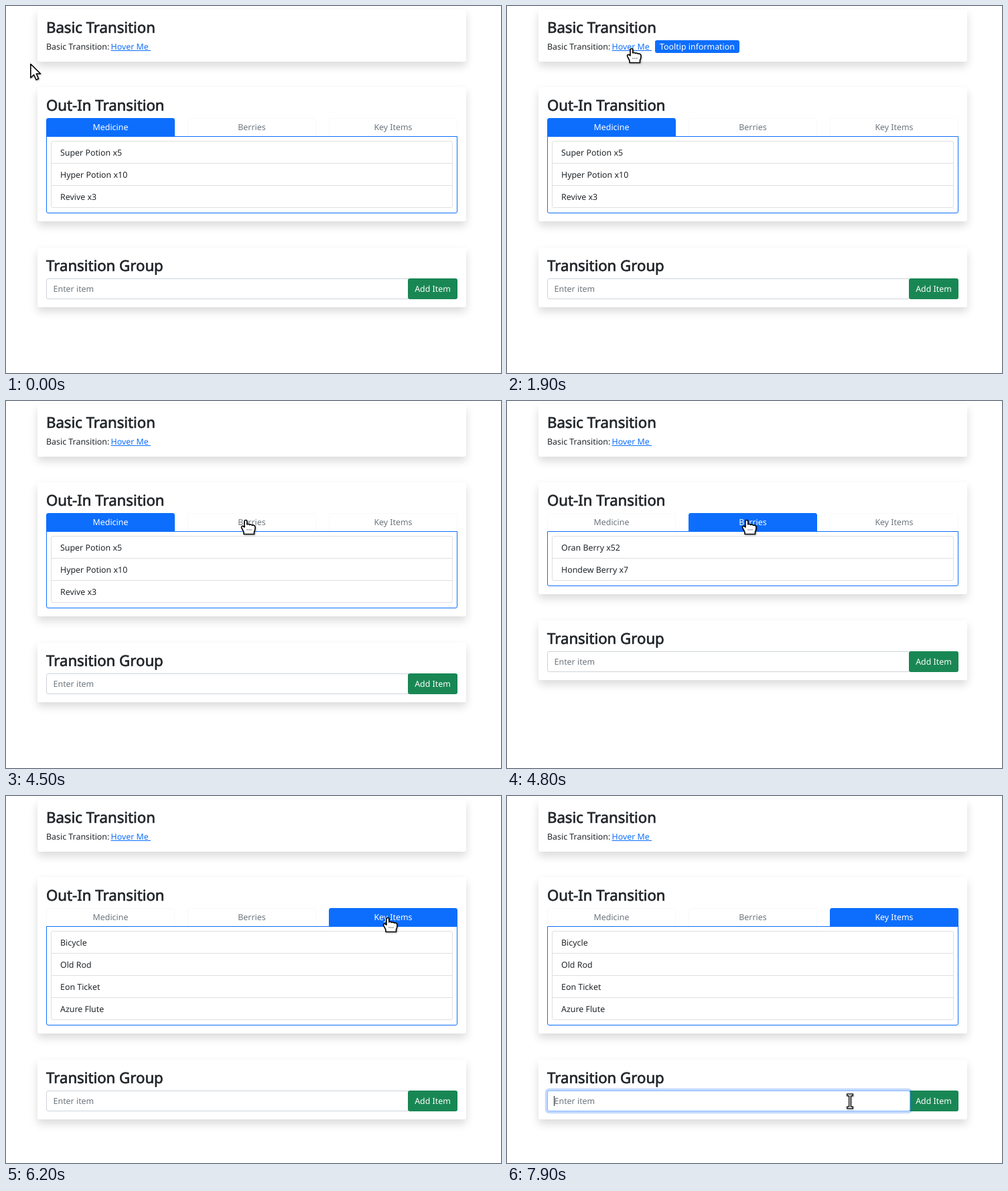
Write an HTML page that moves like this. It is 739 px wide and 547 px high and loops after 8000 ms.

```html
<!DOCTYPE html>
<html lang="en">
<head>
<meta charset="utf-8">
<title>Transitions</title>
<style>
  * { box-sizing: border-box; }
  html, body { margin: 0; width: 100%; height: 100%; overflow: hidden; background: #fff; }
  body {
    position: relative; color: #212529;
    font: 12.4px/19px "Noto Sans", "Open Sans", sans-serif;
    text-rendering: geometricPrecision; white-space: pre; cursor: default;
  }
  .card {
    position: absolute; left: 47px; width: 640px; border-radius: 3px; background: #fff;
    box-shadow: 0 6.4px 12.8px rgba(0, 0, 0, .15);
  }
  .card > * { position: absolute; }
  h3 {
    left: 13px; top: 13px; margin: 0;
    font-size: 22.2px; font-weight: 400; line-height: 27px; -webkit-text-stroke: .7px;
  }
  #basic { top: 5px; height: 78px; }
  #outin { top: 121px; height: calc(101px + 33px * var(--rows)); }
  #group { top: calc(261px + 33px * var(--rows)); height: 89px; }
  .label { left: 13px; top: 46px; }
  .link { left: 109.5px; top: 46px; color: #0d6efd; text-decoration: underline; }
  #tip {
    left: 174px; top: 46px; width: 126px; height: 19px; border-radius: 3px;
    background: #0d6efd; color: #fff; text-align: center;
  }
  .tab {
    left: calc(13px + 211px * var(--i)); top: 46px; width: 192px; height: 28px;
    border: 1px solid #f8f9fa; border-radius: 3px 3px 0 0;
    color: #6c757d; line-height: 26px; text-align: center;
  }
  .tab.on { background: #0d6efd; border-color: #0d6efd; color: #fff; }
  #box {
    left: 13px; top: 73px; width: 614px; height: calc(16px + 33px * var(--rows));
    border: 1px solid #0d6efd; border-radius: 0 0 3px 3px; padding: 6px;
  }
  #list { border: 1px solid #dfdfdf; border-radius: 3px; }
  .row { height: 33px; padding-left: 13px; line-height: 33px; border-bottom: 1px solid #dfdfdf; }
  .row:last-child { height: 32px; border: 0; }
  #field {
    left: 13px; top: 46px; width: 542px; height: 31px; padding-left: 9.6px;
    border: 1px solid #ced4da; border-radius: 3px; background: #fff; color: #6c757d; line-height: 29px;
  }
  #caret { position: absolute; left: 9px; top: 7px; width: 1px; height: 15px; background: #212529; }
  .add {
    left: 553px; top: 46px; width: 74px; height: 31px; border-radius: 3px;
    background: #198754; color: #fff; line-height: 31px; text-align: center;
  }
  #pointer {
    position: absolute; left: 0; top: 0; width: 1px; height: 1px; overflow: visible; z-index: 9;
    filter: drop-shadow(1px 1px 1px rgba(0, 0, 0, .3));
  }
  #pointer path { fill: #fff; stroke: #000; stroke-width: 1.6; stroke-linejoin: round; }
  #pointer .dots { fill: none; stroke-width: 1.2; stroke-dasharray: 1.2 1.6; }
  #pointer .beam { fill: none; stroke-width: 4; }
  #pointer .core { fill: none; stroke: #fff; stroke-width: 1.4; }
</style>
</head>
<body>
<div class="card" id="basic">
  <h3>Basic Transition</h3>
  <span class="label">Basic Transition:</span>
  <span class="link">Hover Me </span>
  <span id="tip">Tooltip information</span>
</div>
<div class="card" id="outin">
  <h3>Out-In Transition</h3>
  <div class="tab" style="--i:0">Medicine</div>
  <div class="tab" style="--i:1">Berries</div>
  <div class="tab" style="--i:2">Key Items</div>
  <div id="box"><div id="list"></div></div>
</div>
<div class="card" id="group">
  <h3>Transition Group</h3>
  <div id="field">Enter item<i id="caret"></i></div>
  <div class="add">Add Item</div>
</div>
<svg id="pointer">
  <g id="arrow"><path d="M.8 1.5V22L5.6 17.5 9 25l3.6-1.6L9.3 16H15.5Z"/></g>
  <g id="hand">
    <path d="M-2 10V1.4a1.9 1.9 0 0 1 3.8 0V6c1-.8 3.2-.6 3.9.6 1-.8 3.1-.5 3.9.8 1.3-.7 3.8-.2 4.2 1.6.6 3 .1 5.5-1.3 8V20.5H-3V17.5C-4 15-5.3 13-6.3 11c-.8-2 1.6-3.4 3-2z"/>
    <path class="dots" d="M1.5 14H10"/>
  </g>
  <g id="ibeam">
    <path class="beam" d="M-5-9.5H5M0-9.5V9.5M-5 9.5H5"/>
    <path class="core" d="M-3.7-9.5h7.4M0-9.5V9.5M-3.7 9.5h7.4"/>
  </g>
</svg>
<script>
  const LOOP = 8000, STEP = 100;
  const $ = id => document.getElementById(id);
  const tabs = document.querySelectorAll('.tab');
  const bags = [
    ['Super Potion x5', 'Hyper Potion x10', 'Revive x3'],
    ['Oran Berry x52', 'Hondew Berry x7'],
    ['Bicycle', 'Old Rod', 'Eon Ticket', 'Azure Flute']
  ];

  // pointer moves, each from where the last one ended
  const moves = [
    { from: 400, to: 1300, x: 188, y: 69, sag: 18 },
    { from: 1300, to: 1400, x: 188, y: 61 },
    { from: 1800, to: 1900, x: 186, y: 64 },
    { from: 1900, to: 2100, x: 183, y: 84 },
    { from: 2300, to: 2400, x: 181, y: 80 },
    { from: 2600, to: 2800, x: 178, y: 56 },
    { from: 3200, to: 3600, x: 176, y: 92 },
    { from: 3800, to: 4500, x: 358, y: 178 },
    { from: 5100, to: 5600, x: 567, y: 187, sag: 10 },
    { from: 5700, to: 5900, x: 570, y: 182 },
    { from: 6600, to: 7300, x: 512, y: 433 },
    { from: 7300, to: 7500, x: 512, y: 455 }
  ];

  const progress = (t, from, to) => Math.min(1, Math.max(0, (t - from) / (to - from)));
  const smooth = k => k * k * (3 - 2 * k);
  const mix = (a, b, k) => a + (b - a) * k;

  function pointerAt(t) {
    let x = 36, y = 85;
    for (const m of moves) {
      const k = smooth(progress(t, m.from, m.to));
      x = mix(x, m.x, k);
      y = mix(y, m.y, k) + (m.sag || 0) * Math.sin(Math.PI * k);
    }
    return [x, y];
  }

  const inside = (x, y, left, top, w, h) => x >= left && x <= left + w && y >= top && y <= top + h;
  const show = (id, on) => { $(id).style.visibility = on ? 'visible' : 'hidden'; };

  let open = -1;
  function openTab(n) {
    if (n === open) return;
    open = n;
    tabs.forEach((tab, i) => tab.classList.toggle('on', i === n));
    $('list').innerHTML = bags[n].map(item => `<div class="row">${item}</div>`).join('');
    document.body.style.setProperty('--rows', bags[n].length);
  }

  function focusField(k) {
    const s = $('field').style;
    s.borderColor = `rgb(${mix(206, 134, k)}, ${mix(212, 183, k)}, ${mix(218, 254, k)})`;
    s.boxShadow = `0 0 0 ${3.2 * k}px rgba(13, 110, 253, ${.25 * k})`;
    s.zIndex = k > 0 ? 3 : 0;
  }

  function draw(now) {
    const t = Math.floor((now % LOOP) / STEP) * STEP;
    openTab(t < 4800 ? 0 : t < 6200 ? 1 : 2);

    const [x, y] = pointerAt(t);
    const onLink = inside(x, y, 156, 51, 60, 17.5);
    const onTab = bags.some((_, i) => inside(x, y, 60 + 211 * i, 167, 192, 28));
    const onField = inside(x, y, 60, 307 + 33 * bags[open].length, 540, 31);
    show('hand', onLink || onTab);
    show('ibeam', onField);
    show('arrow', !onLink && !onTab && !onField);
    show('tip', onLink);
    $('pointer').style.transform = `translate(${Math.round(x)}px, ${Math.round(y)}px)`;

    focusField(progress(t, 7500, 7800));
    show('caret', t >= 7600);
    requestAnimationFrame(draw);
  }
  draw(performance.now());
</script>
</body>
</html>
```
